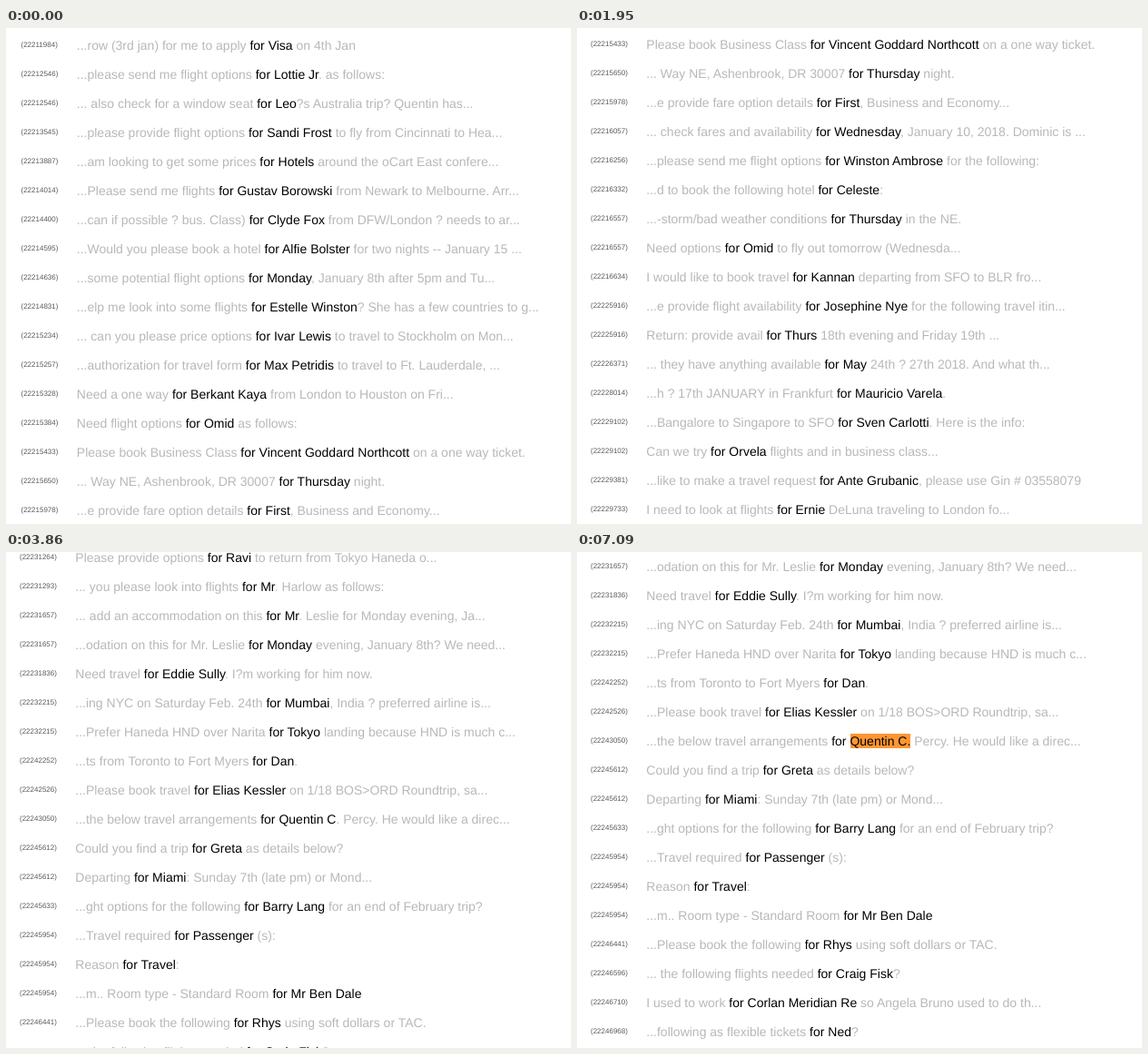
These frames come from a looping animation (622x546 px, 8000 ms). An HTML page with a canvas:

```html
<!DOCTYPE html>
<html lang="en">
<head>
<meta charset="utf-8">
<title>Travel requests</title>
<style>
  html, body { margin: 0; width: 100%; height: 100%; overflow: hidden; background: #fff; }
  #stage { position: relative; width: 622px; height: 546px; overflow: hidden; background: #fff; }
  #list, #mark, #ink { position: absolute; }
  #mark { left: 301px; top: 200px; width: 66px; height: 16px; background: #ff9632; }
  #ink { left: 0; top: 0; }
  .row {
    position: relative; height: 32px; white-space: pre;
    font: 14px/16px "Liberation Sans", Arial, sans-serif;
    text-rendering: geometricPrecision;
  }
  .row span, .row small { position: absolute; }
  .row span { left: 61.3px; top: 0; color: #b8b8b8; }
  .row b { font-weight: normal; color: #000; }
  .row small { left: 0; top: 3px; font-size: 8px; line-height: 9px; color: #58595e; }
</style>
</head>
<body>
<div id="stage">
  <div id="mark"></div>
  <div id="list"></div>
  <canvas id="ink" width="622" height="546"></canvas>
</div>
<script>
// Each line: id, then text with the matched phrase between asterisks.
const LINES = `
22211984 ...row (3rd jan) for me to apply *for Visa* on 4th Jan
22212546 ...please send me flight options *for Lottie Jr*. as follows:
22212546 ... also check for a window seat *for Leo*?s Australia trip? Quentin has...
22213545 ...please provide flight options *for Sandi Frost* to fly from Cincinnati to Hea...
22213887 ...am looking to get some prices *for Hotels* around the oCart East confere...
22214014 ...Please send me flights *for Gustav Borowski* from Newark to Melbourne. Arr...
22214400 ...can if possible ? bus. Class) *for Clyde Fox* from DFW/London ? needs to ar...
22214595 ...Would you please book a hotel *for Alfie Bolster* for two nights -- January 15 ...
22214636 ...some potential flight options *for Monday*, January 8th after 5pm and Tu...
22214831 ...elp me look into some flights *for Estelle Winston*? She has a few countries to g...
22215234 ... can you please price options *for Ivar Lewis* to travel to Stockholm on Mon...
22215257 ...authorization for travel form *for Max Petridis* to travel to Ft. Lauderdale, ...
22215328 Need a one way *for Berkant Kaya* from London to Houston on Fri...
22215384 Need flight options *for Omid* as follows:
22215433 Please book Business Class *for Vincent Goddard Northcott* on a one way ticket.
22215650 ... Way NE, Ashenbrook, DR 30007 *for Thursday* night.
22215978 ...e provide fare option details *for First*, Business and Economy...
22216057 ... check fares and availability *for Wednesday*, January 10, 2018. Dominic is ...
22216256 ...please send me flight options *for Winston Ambrose* for the following:
22216332 ...d to book the following hotel *for Celeste*:
22216557 ...-storm/bad weather conditions *for Thursday* in the NE.
22216557 Need options *for Omid* to fly out tomorrow (Wednesda...
22216634 I would like to book travel *for Kannan* departing from SFO to BLR fro...
22225916 ...e provide flight availability *for Josephine Nye* for the following travel itin...
22225916 Return: provide avail *for Thurs* 18th evening and Friday 19th ...
22226371 ... they have anything available *for May* 24th ? 27th 2018. And what th...
22228014 ...h ? 17th JANUARY in Frankfurt *for Mauricio Varela*.
22229102 ...Bangalore to Singapore to SFO *for Sven Carlotti*. Here is the info:
22229102 Can we try *for Orvela* flights and in business class...
22229381 ...like to make a travel request *for Ante Grubanic*, please use Gin # 03558079
22229733 I need to look at flights *for Ernie* DeLuna traveling to London fo...
22229823 ...book a hotel downtown Toronto *for Jan* 15. Can you please check to s...
22230103 ...the existing Sorvy reservation *for Trisha Arden*?
22230164 ...here is already a reservation *for Helen Roy* at the Astrel Orchards LA for...
22230435 ... need to book personal travel *for Vincent* going to JFK this Sunday to T...
22230435 ...so have a global entry number *for Vincent* and his family to be used goi...
22230548 ... to book the following flight *for Eddie Seltzer*
22230582 ...istance to make a reservation *for Alfonso Escudero*., please see below the inform...
22230640 I?d like to book travel *for Naresh Somanandra* from Washington, DC to India....
22230791 ...request the following options *for Josephine*.
22230791 ...quested to be back in Houston *for Friday* the 9th...
22231264 Please provide options *for Ravi* to return from Tokyo Haneda o...
22231293 ... you please look into flights *for Mr*. Harlow as follows:
22231657 ... add an accommodation on this *for Mr*. Leslie for Monday evening, Ja...
22231657 ...odation on this for Mr. Leslie *for Monday* evening, January 8th? We need...
22231836 Need travel *for Eddie Sully*. I?m working for him now.
22232215 ...ing NYC on Saturday Feb. 24th *for Mumbai*, India ? preferred airline is...
22232215 ...Prefer Haneda HND over Narita *for Tokyo* landing because HND is much c...
22242252 ...ts from Toronto to Fort Myers *for Dan*.
22242526 ...Please book travel *for Elias Kessler* on 1/18 BOS>ORD Roundtrip, sa...
22243050 ...the below travel arrangements *for Quentin C**.* Percy. He would like a direc...
22245612 Could you find a trip *for Greta* as details below?
22245612 Departing *for Miami*: Sunday 7th (late pm) or Mond...
22245633 ...ght options for the following *for Barry Lang* for an end of February trip?
22245954 ...Travel required *for Passenger* (s):
22245954 Reason *for Travel*:
22245954 ...m.. Room type - Standard Room *for Mr Ben Dale*
22246441 ...Please book the following *for Rhys* using soft dollars or TAC.
22246596 ... the following flights needed *for Craig Fisk*?
22246710 I used to work *for Corlan Meridian Re* so Angela Bruno used to do th...
22246968 ...following as flexible tickets *for Ned*?`.slice(1).split("\n");

const LOOP = 8000;

// [time, scroll offset]
const SCROLL = [
  [0, 0], [500, 110], [570, 235], [640, 320], [800, 358], [860, 374],
  [1950, 449], [2010, 580], [2090, 720], [2170, 840], [2250, 911],
  [3720, 1049], [3780, 1190], [3860, 1325], [3940, 1411]
];
const LIST_TOP = 11;
const SHIFT_AT = 800;
const INK_TIMES = [[4780, 5010], [5240, 5700]];
const MARK_AT = 7090;

const el = id => document.getElementById(id);
const list = el("list"), mark = el("mark"), ink = el("ink");

function add(parent, tag, text = "") {
  const node = document.createElement(tag);
  node.textContent = text;
  parent.append(node);
  return node;
}

for (const line of LINES) {
  const row = add(list, "div");
  row.className = "row";
  add(row, "small", `(${line.slice(0, 8)})`);
  const text = add(row, "span");
  line.slice(9).split("*").forEach((part, i) => {
    if (i % 2) add(text, "b", part);
    else text.append(part);
  });
}
const dot = list.children[50].querySelectorAll("b")[1];

function drawInk() {
  const ctx = ink.getContext("2d");
  ctx.strokeStyle = "#f97440";
  ctx.lineCap = ctx.lineJoin = "round";
  const stroke = (width, path) => {
    ctx.lineWidth = width;
    ctx.stroke(new Path2D(path));
  };
  // underline, brace, arrow, question mark
  stroke(4.5, "M302 219 C318 217 330 221 345 219 S358 218 362 219");
  stroke(1.6, "M368 201 C368 194 371 193 377 192 C384 191 387 191 389 186 C391 191 394 191 400 192 C406 193 409 195 409 201");
  stroke(4.5, "M440 247 C430 243 420 237 412 232 C405 228 399 226 394 223");
  stroke(4.5, "M411 224 L393 222 L398 234");
  stroke(4.8, "M448 234 C449 229 453 228 458 228 C463 227 465 229 464 233 C463 238 458 240 459 249");
  stroke(5, "M460 260 L461 260");
}

function render(t) {
  const offset = SCROLL.filter(s => s[0] <= t).pop()[1];
  list.style.top = LIST_TOP - offset + "px";
  list.style.left = (t < SHIFT_AT ? 16.5 : 15) + "px";
  const inked = INK_TIMES.some(([a, b]) => t >= a && t < b);
  ink.style.visibility = inked ? "visible" : "hidden";
  const marked = t >= MARK_AT;
  mark.style.visibility = marked ? "visible" : "hidden";
  dot.style.color = marked ? "#000" : "inherit";
}

const start = performance.now();
function tick() {
  render((performance.now() - start) % LOOP);
  requestAnimationFrame(tick);
}
drawInk();
render(0);
requestAnimationFrame(tick);
</script>
</body>
</html>
```
